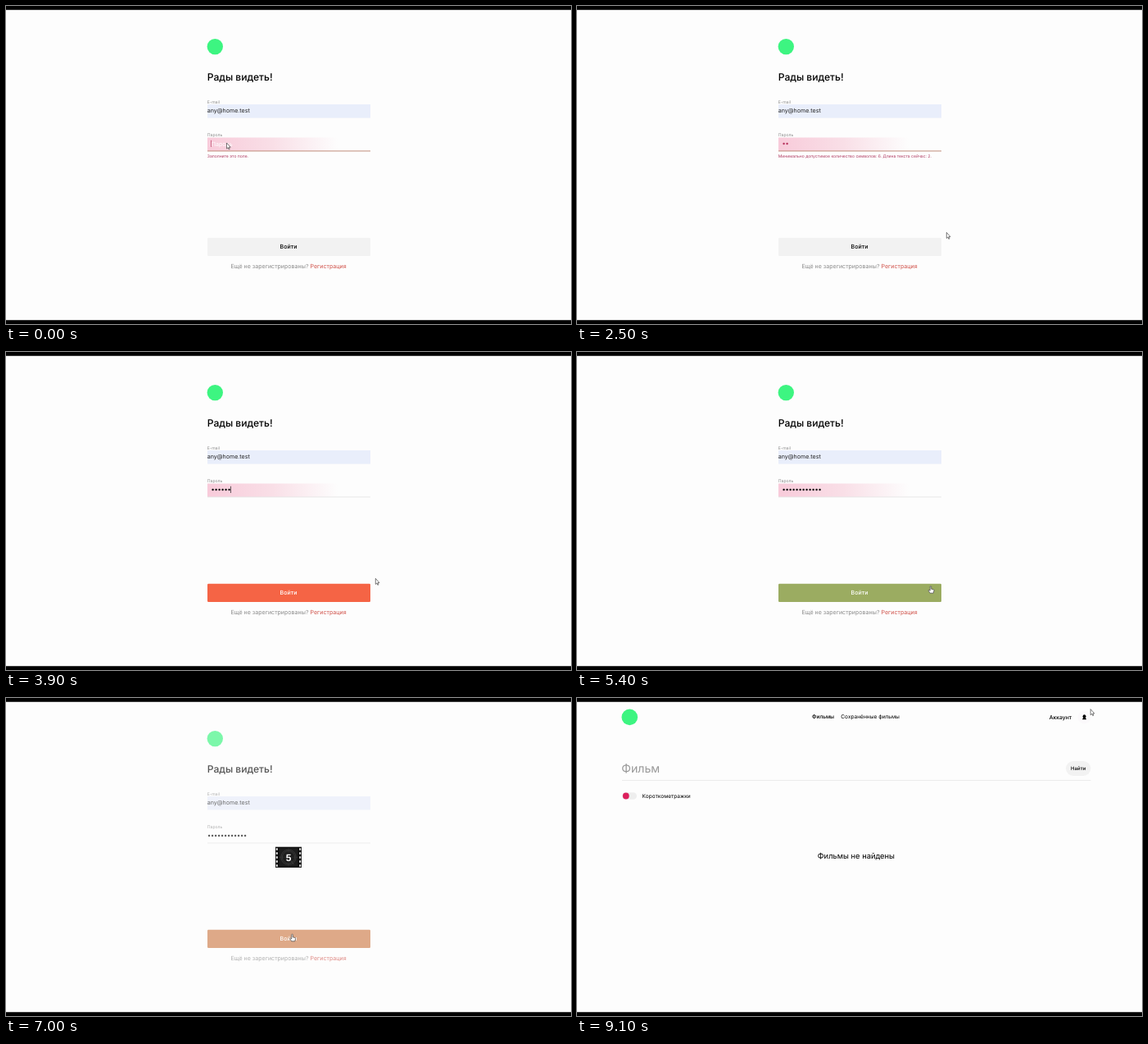
An HTML page for the animation above (9.2 s loop, 690 px wide and 388 px high).

```html
<!DOCTYPE html>
<html lang="ru">
<head>
<meta charset="utf-8">
<title>Вход</title>
<style>
  html, body { margin: 0; width: 100%; height: 100%; overflow: hidden; background: #fdfdfd; }
  svg { display: block; width: 100%; height: 100%; }
  text { font: 400 7.07px Inter, Roboto, sans-serif; text-rendering: geometricPrecision; }
  .mid { text-anchor: middle; }
  .bold { font-weight: 500; }
  .label { font-size: 5.05px; fill: #8b8b8b; }
  .nav { font-size: 6.57px; }
</style>
</head>
<body>
<svg viewBox="0 0 690 388">
  <defs>
    <linearGradient id="pink">
      <stop offset="0" stop-color="#f8cbda"/>
      <stop offset=".4" stop-color="#f9dfe7"/>
      <stop offset=".8" stop-color="#fdfdfd"/>
    </linearGradient>
  </defs>

  <g id="login">
    <circle cx="255.3" cy="49.6" r="9.7" fill="#3df581"/>
    <text class="bold" x="245.7" y="91.2" style="font-size:12.12px">Рады видеть!</text>
    <text class="label" x="245.8" y="118.7">E-mail</text>
    <rect x="246" y="120" width="199" height="16.6" fill="#e9eefb"/>
    <text x="245.8" y="129.6" fill="#222">any@home.test</text>
    <text class="label" x="245.8" y="159.2">Пароль</text>
    <rect id="field" x="246" y="160.5" width="199" height="16.5" fill="url(#pink)"/>
    <rect id="line" x="246" y="176.5" width="199" height=".9"/>
    <text id="hint" x="250.8" y="170.7" fill="#fff">Пароль</text>
    <g id="dots"></g>
    <rect id="caret" y="163.8" width=".7" height="8.2"/>
    <text id="error" x="245.8" y="185" style="font-size:5.05px" fill="#b03a62"></text>
    <rect id="button" x="246" y="282.7" width="199" height="22.3" rx="1.2"/>
    <text id="enter" class="mid bold" x="345" y="296.1">Войти</text>
    <text class="mid" x="345" y="319.9" fill="#8b8b8b">Ещё не зарегистрированы? <tspan fill="#d0524a">Регистрация</tspan></text>
  </g>

  <g id="films">
    <circle cx="64.3" cy="23.4" r="9.8" fill="#3df581"/>
    <text class="nav bold" x="287" y="24.6">Фильмы</text>
    <text class="nav" x="322.3" y="24.6">Сохранённые фильмы</text>
    <text class="bold" x="576.8" y="25.7" style="font-size:6.75px">Аккаунт</text>
    <circle cx="619.6" cy="23.4" r="8" fill="#fbf9fb"/>
    <path d="M617.2 26.2q0-1.6 1.2-1.9a2 2.2 0 1 1 2.4 0q1.2.3 1.2 1.9z"/>
    <text x="54.3" y="91.2" fill="#999" style="font-size:14.14px">Фильм</text>
    <rect x="597" y="77" width="30.4" height="18" rx="9" fill="#f2f2f2"/>
    <text class="mid bold" x="612.2" y="88.1" style="font-size:6.06px">Найти</text>
    <rect x="55" y="100.2" width="572.5" height=".8" fill="#e6e6e6"/>
    <rect x="55" y="115.2" width="18" height="8.6" rx="4.3" fill="#eee"/>
    <circle cx="59.8" cy="119.5" r="3.9" fill="#dc1f5c"/>
    <text class="nav" x="79.6" y="121.9">Короткометражки</text>
    <text class="mid" x="340.9" y="195.8" style="font-size:9.4px">Фильмы не найдены</text>
  </g>

  <g id="loader">
    <rect x="-16" y="-12.6" width="32" height="25.2" fill="#080808"/>
    <rect x="-11.6" y="-11.4" width="23.2" height="22.8" fill="#1d1d1d"/>
    <path d="M-14.2 -11V12M14.2 -11V12" stroke="#f4f4f4" stroke-width="2" stroke-dasharray="2.4 2.6"/>
    <path d="M-11.6 0H11.6M0 -11.4V11.4" stroke="#333" stroke-width=".5"/>
    <path id="sweep" d="M0 0V-11" stroke="#444" stroke-width=".7"/>
    <g fill="none" stroke="#484848" stroke-width=".6"><circle r="9.2"/><circle r="7.6"/></g>
    <text id="count" class="mid" y="4.2" fill="#fff" style="font:700 12px Liberation Sans, sans-serif"></text>
  </g>

  <path d="M0 0H690V4.8H0zM0 383.3H690V388H0z"/>

  <g fill="#fff" stroke="#444" stroke-width=".7">
    <path id="arrow" d="M0 0V7.1L1.6 5.7 2.6 8 3.7 7.5 2.6 5.3H4.7z"/>
    <path id="hand" d="M-.8 0Q0-.8.7 0V3.2L3.6 3.9Q4.2 4.2 4 5L3.2 8.2H-.9L-2.8 5.2Q-2.9 4.2-1.9 4.4L-.8 5.3z"/>
  </g>
</svg>
<script>
const $ = id => document.getElementById(id);
const LOOP = 9200, STEP = 100, SUBMIT = 6600, SWITCH = 7500;
const typed = [1700, 1900, 2600, 3100, 3500, 3700, 4000, 4100, 4200, 4400, 4700, 4800];
const caretOff = [[300, 800], [1300, 1700], [2500, 2600], [5400, 5900], [6400, LOOP]];
// time, x, y of the pointer tip
const track = [
  [0, 269.5, 167], [400, 269.5, 167], [500, 451.3, 276.3], [5300, 451.3, 276.3],
  [5400, 432, 286], [5600, 385, 290], [5900, 361, 289], [6100, 349.8, 288.6],
  [8500, 349.2, 288.6], [8600, 366, 272], [8700, 450, 200], [8800, 560, 105],
  [8900, 634, 40], [9000, 650, 22], [9100, 627.2, 13.6]
];
const gray = [242, 242, 242], orange = [245, 98, 66], green = [60, 250, 130];

const ramp = (t, a, b) => Math.min(1, Math.max(0, (t - a) / (b - a)));
const easeOut = p => 1 - (1 - p) ** 3;
const mix = (a, b, p) => a.map((v, i) => v + (b[i] - v) * p);
const set = (id, attrs) => { for (const k in attrs) $(id).setAttribute(k, attrs[k]); };
const show = (id, on) => set(id, { visibility: on ? 'visible' : 'hidden' });

$('dots').innerHTML = typed.map((_, i) => `<circle cx="${252.6 + 4 * i}" cy="168" r="1.2"/>`).join('');

function pointer(t) {
  const i = track.findIndex(p => p[0] > t);
  if (i < 0) return track.at(-1);
  return mix(track[i - 1], track[i], ramp(t, track[i - 1][0], track[i][0]));
}

function message(n) {
  if (!n) return 'Заполните это поле.';
  return n < 6 ? `Минимально допустимое количество символов: 6. Длина текста сейчас: ${n}.` : '';
}

function buttonColor(t) {
  let c = mix(gray, orange, easeOut(ramp(t, 3600, 4000)));
  c = mix(c, green, easeOut(ramp(t, 5300, 5800)));
  return mix(c, orange, ramp(t, SUBMIT, 7100));
}

function draw(t) {
  const n = typed.filter(k => k <= t).length, valid = n > 5, sent = t >= SUBMIT;

  set('login', { opacity: 1 - ramp(t, 6750, SWITCH) });
  set('films', { opacity: ramp(t, SWITCH, 8000) });

  set('field', { opacity: sent ? 0 : 1 });
  set('line', { fill: valid ? '#e6e6e6' : '#b9806c' });
  set('hint', { opacity: n ? 0 : 1 });
  set('dots', { fill: valid ? '#111' : '#b8355f', transform: `translate(${sent ? -4.5 : 0})` });
  [...$('dots').children].forEach((d, i) => d.setAttribute('opacity', i < n ? 1 : 0));
  set('caret', {
    x: 250.2 + 4 * n,
    fill: valid ? '#222' : '#b8355f',
    opacity: caretOff.some(([a, b]) => t >= a && t < b) ? 0 : 1
  });
  $('error').textContent = message(n);
  set('button', { fill: `rgb(${buttonColor(t).map(Math.round)})` });
  set('enter', { fill: valid ? '#fff' : '#000' });

  show('loader', t >= 6700 && t < 8400);
  set('loader', { transform: `translate(${t < SWITCH ? 345 : 341} 194.3)` });
  set('sweep', { transform: `rotate(${(t - 6600) * .36})` });
  $('count').textContent = t < 7600 ? 5 : 4;

  const [, x, y] = pointer(t), over = t >= 5400 && t < SWITCH;
  show('arrow', !over);
  show('hand', over);
  set(over ? 'hand' : 'arrow', { transform: `translate(${x} ${y})` });
}

function tick() {
  draw(Math.floor(performance.now() % LOOP / STEP) * STEP);
  requestAnimationFrame(tick);
}
tick();
</script>
</body>
</html>
```
